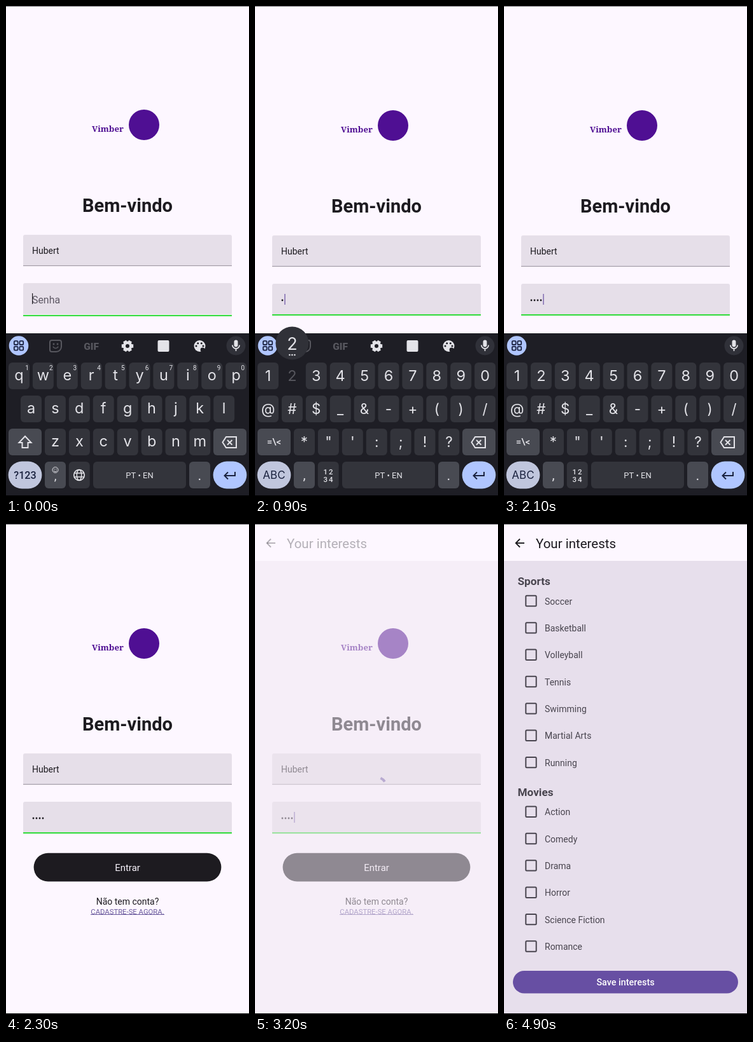
Recreate the animation shown at these times as an HTML page with a canvas. Size 382x771 px, loop 5000 ms.

```html
<!DOCTYPE html>
<html lang="pt">
<head>
<meta charset="utf-8">
<title>Login</title>
<style>
html, body { margin: 0; width: 100%; height: 100%; overflow: hidden; background: #fdf7ff; }
canvas { display: block; width: 382px; height: 771px; }
</style>
</head>
<body>
<canvas id="stage"></canvas>
<script>
const W = 382, H = 771, LOOP = 5000;
const canvas = document.getElementById('stage');
const g = canvas.getContext('2d');
const dpr = window.devicePixelRatio || 1;
canvas.width = W * dpr;
canvas.height = H * dpr;

const SANS = 'Roboto, "Open Sans", sans-serif';
const KEYS = 'Inter, Roboto, sans-serif';
const SERIF = '"Noto Serif", "Liberation Serif", serif';
const C = {
  page: '#fdf7ff', ink: '#1d1b20', field: '#e6dfe9', purple: '#674fa3', logo: '#4f0f93',
  board: '#1e1e25', key: '#33343b', mod: '#484a52', glyph: '#e3e3e8', blue: '#b0c6ff', dim: '#57575e', navy: '#1b2340'
};

// start, end, key column, label
const TAPS = [[800, 990, 1, '2'], [1000, 1110, 0, '1'], [1180, 1290, 1, '2'], [1590, 1690, 2, '3']];
const SYMBOLS_AT = 400, ICONS_OFF = 1700;

function ramp(t, points) {
  if (t <= points[0][0]) return points[0][1];
  for (let i = 1; i < points.length; i++) {
    const [t0, v0] = points[i - 1], [t1, v1] = points[i];
    if (t <= t1) return v0 + (v1 - v0) * (t - t0) / (t1 - t0);
  }
  return points[points.length - 1][1];
}

function rect(x, y, w, h, color) {
  g.fillStyle = color;
  g.fillRect(x, y, w, h);
}

function round(x, y, w, h, r, color) {
  g.fillStyle = color;
  g.beginPath();
  g.roundRect(x, y, w, h, r);
  g.fill();
}

function disc(x, y, r, color) {
  g.fillStyle = color;
  g.beginPath();
  g.arc(x, y, r, 0, Math.PI * 2);
  g.fill();
}

function line(color, width, ...pts) {
  g.strokeStyle = color;
  g.lineWidth = width;
  g.beginPath();
  pts.forEach(([x, y], i) => i ? g.lineTo(x, y) : g.moveTo(x, y));
  g.stroke();
}

function ring(x, y, rx, ry, width, color, a = 0, b = Math.PI * 2) {
  g.strokeStyle = color;
  g.lineWidth = width;
  g.beginPath();
  g.ellipse(x, y, rx, ry, 0, a, b);
  g.stroke();
}

// cy is the middle of the capital letters
function text(s, x, cy, size, color, align = 'left', weight = 400, family = SANS) {
  g.font = `${weight} ${size}px ${family}`;
  g.textAlign = align;
  g.fillStyle = color;
  g.fillText(s, x, cy + size * 0.355);
}

const label = (s, x, y, size, color = C.glyph, weight = 400, family = SANS) =>
  text(s, x, y, size, color, 'center', weight, family);

function drawLogin(t) {
  rect(0, 0, W, H, C.page);
  g.save();
  if (t < 100) g.translate(0, -1);
  disc(217, 188, 24, C.logo);
  text('Vimber', 135, 194, 13.2, C.logo, 'left', 700, SERIF);
  label('Bem-vindo', 191, 315, 29, C.ink, 700);

  round(27, 361, 328, 49, [3, 3, 0, 0], C.field);
  rect(27, 409, 328, 1.2, '#a29ba6');
  text('Hubert', 41, 386.5, 14, C.ink);

  round(27, 437, 328, 49, [3, 3, 0, 0], C.field);
  rect(27, t < 100 ? 487 : 485, 328, 2.2, '#38dc42');
  const dots = TAPS.filter(tap => t >= tap[0]).length;
  if (!dots) text('Senha', 41, 463, 15.9, '#5f5a66');
  for (let i = 0; i < dots; i++) disc(43 + i * 5, 463, 1.4, C.ink);
  if (t < 2200 || t >= 2700) {
    rect(41 + (dots ? 0.4 + dots * 5 : 0), 453, 1.2, 17, dots ? C.purple : C.ink);
  }
  g.restore();

  round(43.6, 517.7, 294.8, 44.8, 22.4, C.ink);
  label('Entrar', 191, 541, 15, '#f7f2fa');
  label('Não tem conta?', 191, 594.5, 14, C.ink);
  label('CADASTRE-SE AGORA.', 191, 609.5, 11.3, '#6b5a9e');
  rect(133, 614, 116, 1, '#6b5a9e');
}

function drawMic() {
  disc(361.5, 534.5, 15, '#303139');
  round(358.5, 525.5, 6, 11, 3, C.glyph);
  ring(361.5, 533.5, 5.6, 5.6, 1.7, C.glyph, 0, Math.PI);
  line(C.glyph, 1.7, [361.5, 539], [361.5, 543]);
}

function drawTools() {
  // sticker
  g.strokeStyle = C.dim;
  g.lineWidth = 2;
  g.beginPath();
  g.roundRect(69, 526, 18, 18, [3, 3, 8, 3]);
  g.stroke();
  disc(75, 532, 1.4, C.dim);
  disc(81, 532, 1.4, C.dim);
  ring(78, 535, 4, 3.5, 1.6, C.dim, 0.2, Math.PI - 0.2);
  label('GIF', 134, 535, 15.5, C.dim, 900);

  // gear
  for (let i = 0; i < 6; i++) {
    const a = i * Math.PI / 3, c = Math.cos(a), s = Math.sin(a);
    line(C.glyph, 5.6, [191 + c * 5, 535 + s * 5], [191 + c * 9.2, 535 + s * 9.2]);
  }
  ring(191, 535, 5.2, 5.2, 4.4, C.glyph);

  round(238.5, 526, 18, 18, 2, C.glyph);

  // palette
  disc(304.5, 535, 9, C.glyph);
  disc(309, 541, 3.4, C.board);
  [[299, 535], [301.7, 530.7], [307.3, 530.7], [310, 535]].forEach(([x, y]) => disc(x, y, 1.5, C.board));
}

function key(x, y, w, color = C.key, r = 6) {
  round(x, y, w, 42, r, color);
}

function pill(x, y, color) {
  round(x - 0.4, y - 0.4, 52.8, 42.8, 21.4, color);
}

function keyRow(chars, first, y, size, lift = 0, pressed = -1) {
  [...chars].forEach((ch, i) => {
    const x = first + i * 37.9;
    if (i !== pressed) key(x - 16.5, y, 33);
    label(ch, x, y + 21 - lift, size, i === pressed ? C.dim : C.glyph, 400, KEYS);
  });
}

function drawBackspace() {
  const c = C.glyph;
  line(c, 2, [346, 678], [362, 678], [362, 695], [346, 695], [340.5, 686.5], [346, 678], [348, 678]);
  line(c, 2, [348, 683], [355.5, 690.5]);
  line(c, 2, [355.5, 683], [348, 690.5]);
}

function drawGlobe() {
  ring(115, 738, 8.3, 8.3, 1.7, C.glyph);
  ring(115, 738, 3.7, 8.3, 1.5, C.glyph);
  line(C.glyph, 1.5, [107.5, 735], [122.5, 735]);
  line(C.glyph, 1.5, [107.5, 741], [122.5, 741]);
}

function drawLetters() {
  keyRow('qwertyuiop', 20.5, 561, 23.5, 1.5);
  for (let i = 0; i < 10; i++) label(String((i + 1) % 10), 33 + i * 37.7, 569, 10);
  keyRow('asdfghjkl', 39.5, 613, 23.5, 1.5);
  keyRow('zxcvbnm', 77.5, 665, 23.5, 1);
  line(C.glyph, 2, [30, 677], [20.5, 687], [25.5, 687], [25.5, 695], [34.5, 695], [34.5, 687], [39.5, 687], [30, 677], [28, 679]);
  label('?123', 30, 738, 16.2, C.navy, 500);
  ring(77.5, 730, 4.5, 4.5, 1, C.glyph);
  ring(77.5, 730.5, 2.3, 2.3, 1, C.glyph, 0.2, Math.PI - 0.2);
  disc(76, 728.8, 0.7, C.glyph);
  disc(79, 728.8, 0.7, C.glyph);
  label(',', 77.5, 739, 19);
  drawGlobe();
}

function drawSymbols(pressed) {
  keyRow('1234567890', 20.5, 561, 23.5, 0, pressed);
  keyRow('@#$_&-+()/', 20.5, 613, 22.5);
  keyRow('*"\':;!?', 77.5, 665, 22.5);
  label('=\\<', 30, 686, 15, C.glyph, 500);
  label('ABC', 30, 738, 17, C.navy, 400, KEYS);
  label(',', 77.5, 738, 21);
  ['12', '34'].forEach((pair, row) => {
    [...pair].forEach((d, i) => label(d, 110.7 + i * 8.5, 733 + row * 11.5, 11.5, C.glyph, 500));
  });
}

function drawKeyboard(t) {
  const tap = TAPS.find(k => t >= k[0] && t < k[1]);
  rect(0, 515, W, 256, C.board);

  disc(20, 534.5, 15.3, C.blue);
  g.strokeStyle = C.navy;
  g.lineWidth = 1.8;
  for (let i = 0; i < 4; i++) {
    g.beginPath();
    g.roundRect(12.8 + (i % 2) * 8.6, 527.2 + (i >> 1) * 8.6, 5.8, 5.8, 1.3);
    g.stroke();
  }
  if (t < ICONS_OFF) drawTools();
  drawMic();

  key(4, 665, 52, C.mod);
  key(326, 665, 52, C.mod);
  pill(4, 717, '#c0c6dd');
  key(61, 717, 33, C.mod);
  key(98.7, 717, 33);
  key(137, 717, 146);
  key(288, 717, 33, C.mod);
  pill(326, 717, C.blue);
  drawBackspace();
  label('PT • EN', 210, 738.5, 13);
  label('.', 304.5, 738, 22);
  line(C.navy, 2, [360, 733], [360, 739], [343.5, 739]);
  line(C.navy, 2, [349, 733.5], [343.5, 739], [349, 744.5]);

  if (t < SYMBOLS_AT) drawLetters();
  else drawSymbols(tap ? tap[2] : -1);

  if (tap) {
    const x = 20.5 + tap[2] * 37.9;
    disc(x, 530.5, 26, '#303138');
    label(tap[3], x, 531, 27, C.glyph, 400, KEYS);
    for (let i = -1; i < 2; i++) disc(x + i * 4, 549, 1.3, C.glyph);
  }
}

function drawGroup(title, y, first, items) {
  text(title, 21.5, y, 17.2, '#49454f', 'left', 700);
  items.forEach((item, i) => {
    const cy = first + i * 42.35;
    g.strokeStyle = '#49454f';
    g.lineWidth = 2;
    g.beginPath();
    g.roundRect(34.3, cy - 8.2, 16.4, 16.4, 1.5);
    g.stroke();
    text(item, 64, cy + 0.7, 14, '#49454f');
  });
}

function drawInterests(t) {
  const cover = ramp(t, [[3000, 0], [3200, 0.54], [3350, 0.82], [3500, 0.94], [3700, 1]]);
  if (!cover) return;
  const tone = ramp(t, [[3200, 0], [3450, 1]]);
  const mix = (a, b) => Math.round(a + (b - a) * tone);

  g.globalAlpha = cover;
  rect(0, 58, W, 713, `rgb(${mix(240, 231)},${mix(232, 223)},${mix(242, 236)})`);
  rect(0, 0, W, 58, C.page);

  g.globalAlpha = ramp(t, [[3100, 0], [3200, 0.32], [3500, 0.87], [3650, 1]]);
  line(C.ink, 1.9, [32, 30], [19, 30]);
  line(C.ink, 1.9, [25, 23.5], [18.6, 30], [25, 36.5]);
  text('Your interests', 50, 30.5, 20.5, C.ink);

  if (t >= 3150 && t < 3300) {
    g.globalAlpha = 0.38;
    const turn = (t - 3200) / 250;
    ring(191, 414, 15.6, 15.6, 4, C.purple, -1.15 + turn, -0.6 + turn * 1.8);
  }

  g.globalAlpha = ramp(t, [[3250, 0], [3500, 0.82], [3700, 1]]);
  if (g.globalAlpha > 0) {
    drawGroup('Sports', 90, 121, ['Soccer', 'Basketball', 'Volleyball', 'Tennis', 'Swimming', 'Martial Arts', 'Running']);
    drawGroup('Movies', 422, 452.7, ['Action', 'Comedy', 'Drama', 'Horror', 'Science Fiction', 'Romance']);
    round(14, 703, 354, 35.5, 17.7, C.purple);
    label('Save interests', 191, 721, 14.4, '#ffffff', 500);
  }
  g.globalAlpha = 1;
}

function draw(t) {
  g.setTransform(dpr, 0, 0, dpr, 0, 0);
  g.globalAlpha = 1;
  drawLogin(t);
  if (t < 2300) {
    const k = ramp(t, [[2120, 0], [2290, 1]]);
    g.save();
    g.translate(0, 256 * k * k * (3 - 2 * k));
    drawKeyboard(t);
    g.restore();
  }
  drawInterests(t);
  rect(0, 0, W, 1, '#77737a');
  rect(0, 770, W, 1, '#000');
}

const start = performance.now();
function tick() {
  draw((performance.now() - start) % LOOP);
  requestAnimationFrame(tick);
}
tick();
</script>
</body>
</html>
```
